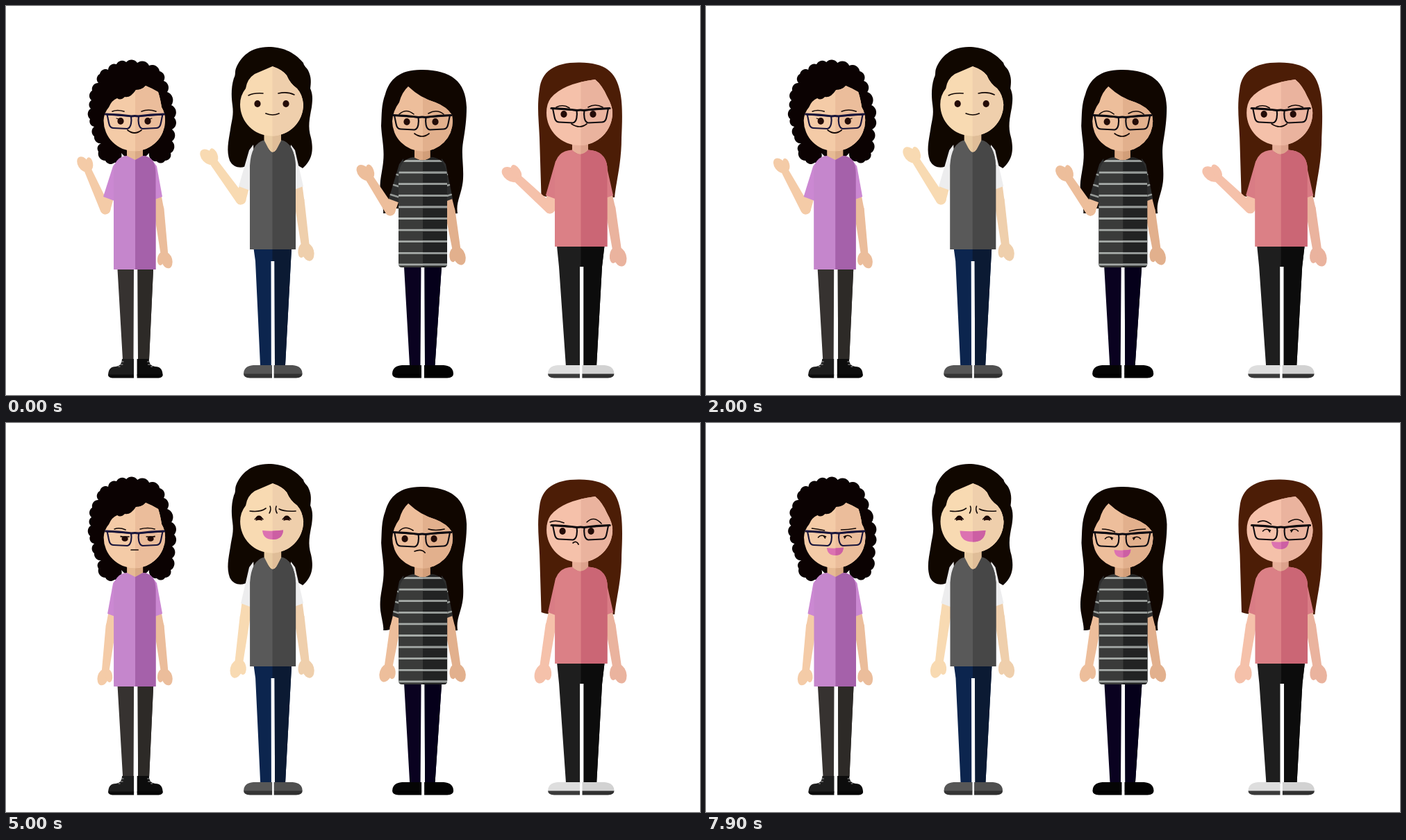
Write an HTML page that moves like this. It is 999x561 px and loops after 8000 ms.

```html
<!DOCTYPE html>
<html lang="en">
<head>
<meta charset="utf-8">
<title>Four friends waving</title>
<style>
html, body { margin: 0; width: 100%; height: 100%; overflow: hidden; background: #fff; }
svg { display: block; width: 999px; height: 561px; }
</style>
</head>
<body>
<svg id="stage" viewBox="0 0 999 561" xmlns="http://www.w3.org/2000/svg"></svg>
<script>
const LOOP = 8000;
const stage = document.getElementById('stage');
const lerp = (a, b, k) => a + (b - a) * k;
const clamp = k => Math.max(0, Math.min(1, k));
const smooth = k => (k = clamp(k), k * k * (3 - 2 * k));
const shape = (d, fill) => `<path d="${d}" fill="${fill}"/>`;
const line = (d, w = 1.7, c = '#120806') =>
  `<path d="${d}" fill="none" stroke="${c}" stroke-width="${w}" stroke-linecap="round" stroke-linejoin="round"/>`;
const mirror = (x, body) => `<g transform="translate(${2 * x} 0) scale(-1 1)">${body}</g>`;
const ellipse = (x, y, rx, ry, fill, turn = 0) =>
  `<ellipse cx="${x}" cy="${y}" rx="${rx}" ry="${ry}" fill="${fill}" transform="rotate(${turn} ${x} ${y})"/>`;
// light left half, dark right half
const split = (d, who, [a, b]) =>
  shape(d, a) + `<path d="${d}" fill="${b}" clip-path="url(#half${who.id})"/>`;

// outline made of outward bumps through the given points
function curls(p) {
  let d = `M${p[0]},${p[1]}`;
  for (let i = 2; i <= p.length; i += 2) {
    const j = i % p.length;
    const r = Math.hypot(p[j] - p[i - 2], p[j + 1] - p[i - 1]) * 0.62;
    d += `A${r.toFixed(1)},${r.toFixed(1)} 0 0 1 ${p[j]},${p[j + 1]}`;
  }
  return d + 'Z';
}

function glasses(x, y, c) {
  const lens = 'M-40,1L-5.500,3.500C-4.500,10 -5,20.500 -11,21.500L-31,20.500C-38,20 -37,13 -40,1Z';
  return `<g transform="translate(${x} ${y})">` + line(lens, 2.1, c) + mirror(0, line(lens, 2.1, c)) +
    line('M-42,0.500Q-22,1 -5,3.500Q0,2.500 5,3.500Q22,1 42,0.500', 3.2, c) + '</g>';
}

function shoe(x1, x2, c, sole) {
  return shape(`M${x2},518H${x1 + 14}Q${x1},519 ${x1},531H${x2}Z`, c) +
    shape(`M${x1},530.5H${x2}V536.5H${x1 + 9}Q${x1},536 ${x1},530.5Z`, sole);
}
const boot = (c, sole) =>
  shape('M167,509H184V533H147Q147,520 158,520Q167,519 167,509Z', c) +
  shape('M147,531.5H184V536.5H153Q147,536 147,531.5Z', sole) +
  line('M166,513h3M165,517h3M162,520h2', 1, '#aaa');

// each arm pose: sleeve hem x, elbow x y, hand x y
const people = [
  {
    id: 0, x: 186, skin: ['#f4cba7', '#ebbd9b'], neck: ['#e6ba94', '#d9a985'],
    hair: ['#0b0202', curls([159, 84, 173, 81, 189, 82, 206, 86, 221, 94, 227, 108, 232, 124, 238, 143, 242, 161,
      239, 178, 239, 195, 237, 212, 229, 223, 217, 224, 206, 212, 166, 212, 156, 226, 143, 223, 133, 210, 137, 198,
      127, 188, 127, 174, 121, 163, 122, 148, 123, 136, 124, 122, 133, 111, 135, 98, 147, 92])],
    face: 'M140.5,165Q141,154 148,146Q152,136 160,133Q165,137 171,131Q179,133 187,121Q196,121 201,115Q211,119 219,124Q222,133 224,146Q229,154 229,165A44.2,44.2 0 0 1 140.5,165Z',
    neckBox: 'M174,202H197V218L186,224L174,218Z',
    shirt: ['#c586cc', '#a561aa'],
    body: 'M155,380V240Q156,217 174,216L186,222L197,216Q215,217 215.500,240V380Z',
    pants: ['#363230', '#2d2a27'], legs: 'M160.500,380H184L183.500,510H168ZM189.500,380H212L206,510H190Z',
    shoes: boot('#1e1e1e', '#0c0c0c') + mirror(186.3, boot('#0c0c0c', '#050505')),
    sleeve: '#cb88d2', sy: 231, sx: 156, hy: 275, hand: 0.88,
    poses: [[140, 143, 293, 114, 228], [141, 143, 293, 120, 225], [140, 146, 293, 72, 276], [146, 151, 293, 142, 366]],
    glass: [185.5, 155.5, '#17143a'], lash: true
  },
  {
    id: 1, x: 383.5, skin: ['#f8dab2', '#efcfac'], neck: ['#e9cba2', '#dfbd98'],
    hair: ['#100700', 'M378,59C352,59 338,73 331,90C329,96 331,99 328,104C323,120 325,136 326,143C328,158 325,164 323,178C320,196 317,209 322,223C328,235 342,235 350,228H410C418,227 423,232 427,234C441,222 443,208 439,190C434,174 437,162 440,146C442,132 441,126 438,119C439,111 440,103 435,93C433,89 429,87 428,82C414,65 396,59 378,59Z'],
    face: 'M337,142Q337,129 345,119Q347,105 358,98Q372,92 383.500,87Q398,92 404,100Q409,112 419,119Q427,128 428,142A45.5,45.5 0 0 1 337,142Z',
    neckBox: 'M371.500,180H396V198L384,214L371.500,198Z',
    shirt: ['#595959', '#474747'],
    body: 'M351,351V230Q353,198 371.500,193.500L379,208Q384,214 389,208L396.500,193.500Q415,198 417,230V351Z',
    pants: ['#0c254e', '#0b1a33'], legs: 'M356.500,350H411L402,518H387L386.500,368H381.500L381.800,518H366L359,368Z',
    shoes: shoe(342, 383, '#575757', '#353535') + mirror(384.3, shoe(342, 383, '#4f4f4f', '#303030')),
    sleeve: '#ededee', sy: 208, sx: 352, hy: 260, hand: 0.98,
    poses: [[335, 338, 279, 293, 217], [335, 338, 279, 302, 211], [335, 338, 279, 292, 218], [338, 344, 280, 334, 354]]
  },
  {
    id: 2, x: 600, skin: ['#edbe9b', '#e2b08d'], neck: ['#deab86', '#d29e79'],
    hair: ['#100600', 'M600,92C568,91 552,105 546,127C540,143 541,156 540,173C541,192 545,205 543,225C541,243 537,254 539,271C541,284 544,294 543,299C552,299 556,298 559,292H636C640,299 646,300 650,299C647,282 657,270 658,249C659,228 655,215 658,196C661,178 663,164 663,146C662,108 640,93 600,92Z'],
    face: 'M556,166Q557,151 566,139Q570,124 579,116Q597,133 618,139Q634,145 642,157L643,166A43.500,43.500 0 0 1 556,166Z',
    neckBox: 'M588,204H610.500V219L600,224L588,219Z',
    shirt: ['#3a3b3a', '#222323'],
    body: 'M565,372V244Q567,220 587,218Q600,227 612,218Q633,220 635,244V372Q635,377 630,377H570Q565,377 565,372Z',
    stripe: { top: 223.5, gap: 16.6, count: 10 },
    pants: ['#0a0220', '#05001a'], legs: 'M573,376H597.500L596.500,518H581ZM602.500,376H627L617.500,518H603Z',
    shoes: shoe(556, 598, '#050505', '#000') + mirror(600, shoe(556, 598, '#020202', '#000')),
    sleeve: '#2d2e2e', sy: 228, sx: 568, hy: 278, hand: 0.98,
    poses: [[551, 553, 295, 518, 240], [551, 553, 295, 526, 236], [551, 555, 296, 491, 272], [556, 560, 295, 549, 360]],
    glass: [599, 157, '#0c0b12']
  },
  {
    id: 3, x: 827.5, skin: ['#f5c1aa', '#eab39e'], neck: ['#e8b09a', '#dca18c'],
    hair: ['#4c1d06', 'M826,81.500C790,81 771,94 768,120C764,145 767,165 768,190L770.500,273Q778,276 790,276H870L876,276C878,254 886,228 886,190C887,168 888,142 884,124C878,94 862,82 826,81.500Z'],
    face: 'M778,154Q778,141 784,133Q801,112 848,106Q858,114 865,130Q873,144 873,154A47.5,47 0 0 1 778,154Z',
    neckBox: 'M815,194H838V209L827,216L815,209Z',
    shirt: ['#db8086', '#cb6675'],
    body: 'M790,347V232Q792,209 815,207.500Q827,220 838,207.500Q863,209 865.500,232V347Z',
    pants: ['#1e1e1e', '#0c0c0c'], legs: 'M793,346H861.500L858,376L850,520H831.500V376H826V520H806L796,376Z',
    shoes: shoe(780, 826, '#dedede', '#3a3a3a') + mirror(827.7, shoe(780, 826, '#d2d2d2', '#303030')),
    sleeve: '#d97c85', sy: 224, sx: 793, hy: 273, hand: 1.06,
    poses: [[777, 783, 292, 729, 242], [777, 783, 292, 738, 234], [777, 784, 290, 714, 267], [780, 784, 292, 773, 361]],
    glass: [827, 147, '#0e0a0e']
  }
];

// [from ms, left eye x, right eye x, eye y, eye kind, brows, mouth]
const tense = 'M351,127Q366,129 374,123M393,124Q400,128 417,127M380,120Q382,125 379,130M389,120Q387,125 390,130';
const faces = [
  [
    [0, 165, 204, 166, 'dot', 'M153,152Q160,149 170,152M195,152Q205,148 216,152', 'M175,179Q185,187 195,179'],
    [3000, 171, 208, 166, 'dot', 'M156,151Q163,149 172,153M193,152Q204,149 214,152', 'M180,182Q187,179 195,183'],
    [4400, 171, 208, 167, 'lid', 'M156,153Q163,150 172,154M193,153Q204,150 214,153', 'M180,183H190'],
    [5800, 166, 204, 167, 'dot', 'M152,152Q161,153 170,155M194,154Q204,154 215,152', 'M179,181Q186,184 194,181'],
    [7200, 166, 204, 164, 'joy', 'M152,152Q161,153 170,155M194,154Q204,154 215,152', 'O173.500,180 24 11']
  ],
  [
    [0, 362, 403, 141, 'dot', 'M349,129Q357,125 370,126M392,126Q405,123 415,128', 'M374,155Q384,159 393,155'],
    [2300, 362, 403, 141, 'dot', 'M349,128Q357,124 370,126M392,125Q405,122 415,127', 'M375,154.500Q386,161 395,153'],
    [3300, 364, 404, 138, 'arc', tense, 'O369,155 30 13'],
    [7200, 364, 404, 138, 'arc', tense, 'O365,155.500 37 16']
  ],
  [
    [0, 577, 618, 167, 'dot', 'M566,156Q576,147 587,156M608,155Q620,148 630,156', 'M588,184Q599,192 609,184'],
    [3000, 574, 616, 167, 'dot', 'M566,155Q574,149 586,156M607,157Q618,151 630,155', 'M590,186Q597,182 605,187'],
    [4400, 574, 616, 167, 'dot', 'M566,156Q574,147 586,155M608,153Q618,156 631,153', 'M588,185Q598,181 603,187'],
    [5800, 579, 620, 167, 'dot', 'M570,153Q579,153 588,157M609,156Q620,153 632,153', 'M592,183Q599,187 607,183'],
    [7200, 579, 620, 166, 'joy', 'M570,153Q579,153 588,157M609,156Q620,153 632,153', 'O587,183 24 11']
  ],
  [
    [0, 803, 845, 156, 'dot', 'M792,146Q802,141 811,147M838,146Q848,140 859,146', 'M814,170Q826,178 836,170'],
    [3000, 801, 842, 156, 'dot', 'M791,147Q800,141 809,147M836,147Q845,141 857,146', 'M817,173Q824,169 832,174'],
    [4400, 801, 842, 156, 'dot', 'M783,143Q791,139 803,144M836,143Q846,133 857,145', 'M816,173Q821,169 824,175'],
    [5800, 806, 847, 156, 'dot', 'M794,143Q803,138 813,146M838,143Q850,135 859,143', 'M819,172Q827,176 834,172'],
    [7200, 806, 847, 155, 'joy', 'M794,143Q803,138 813,146M838,143Q850,135 859,143', 'O813.500,171 25 11']
  ]
];

function eye(x, y, kind, side, lash) {
  if (kind === 'joy') return line(`M${x - 6 * side},${y}Q${x + side},${y - 4} ${x + 5 * side},${y + 1}M${x - 3 * side},${y - 1}L${x - 5 * side},${y + 2}`, 1.6);
  if (kind === 'arc') return shape(`M${x - 4.5},${y + 3}V${y}A4.5,4.5 0 0 1 ${x + 4.5},${y}V${y + 3}Q${x},${y + 1} ${x - 4.5},${y + 3}Z`, '#230b07') +
    line(`M${x - 6},${y + 1}Q${x},${y - 7} ${x + 6},${y + 1}`, 1.3);
  const lashes = lash ? line(`M${x + 3 * side},${y - 3}l${3 * side},-1`, 1.2) : '';
  const lid = kind === 'lid' ? line(`M${x - 6},${y - 3}h12`, 1.5) : '';
  return ellipse(x, y, 4.6, kind === 'lid' ? 3.8 : 5, '#230b07') + lashes + lid;
}

function drawFace(who, t) {
  const [, lx, rx, y, kind, brows, mouth] = faces[who.id].filter(f => f[0] <= t).pop();
  let lips;
  if (mouth[0] === 'O') {
    const [x, my, w, h] = mouth.slice(1).split(/[ ,]/).map(Number);
    lips = split(`M${x},${my}q${w / 2},1.500 ${w},-0.500Q${x + w - 1},${my + h} ${x + w / 2},${my + h}Q${x + 1},${my + h} ${x},${my}Z`, who, ['#dc72b1', '#cc5fa3']);
  } else lips = line(mouth);
  return eye(lx, y, kind, -1, who.lash) + eye(rx, y, kind, 1, who.lash) + line(brows, 1.6) + lips +
    (who.glass ? glasses(...who.glass) : '');
}

function mixPose(a, b, k) {
  const polar = p => {
    const dx = p[3] - p[1], dy = p[4] - p[2];
    return [(Math.atan2(dy, dx) + 2 * Math.PI) % (2 * Math.PI), Math.hypot(dx, dy)];
  };
  const [a1, l1] = polar(a), [a2, l2] = polar(b);
  const ang = lerp(a1, a2, k), len = lerp(l1, l2, k);
  const [hem, ex, ey] = [0, 1, 2].map(i => lerp(a[i], b[i], k));
  return [hem, ex, ey, ex + len * Math.cos(ang), ey + len * Math.sin(ang)];
}

function arm(who, pose, skin, thumb) {
  const [hem, ex, ey, hx, hy] = pose;
  const len = Math.hypot(hx - ex, hy - ey), turn = Math.atan2(hy - ey, hx - ex) * 180 / Math.PI;
  const s = who.hand, top = who.sx, inner = hem + 16;
  const upper = line(`M${hem + 9},${who.hy - 3}L${ex},${ey}`, 14.5, skin);
  const fore = shape(`M0,-7.500L${len - 8},-${6 * s}V${6 * s}L0,7.500A7.500,7.500 0 0 1 0,-7.500Z`, skin);
  const palm = ellipse(len + 1, -2.5 * thumb, 13.5 * s, 8.8 * s, skin, -8 * thumb) +
    ellipse(len - 2, 6 * thumb, 10.5 * s, 5.5 * s, skin, 14 * thumb);
  const cuff = `M${top + 4},${who.sy - 8}L${top - 2},${who.sy}L${hem},${who.hy}L${inner},${who.hy + 6}L${top + 8},${who.hy}Z`;
  let bands = '';
  if (who.stripe) {
    for (const y of [243, 258, 272]) {
      const x = lerp(top - 2, hem, (y - who.sy) / (who.hy - who.sy));
      bands += line(`M${x + 1},${y}L${x + 14},${y + 4}`, 2.5, '#969b98');
    }
  }
  return upper + `<g transform="translate(${ex} ${ey}) rotate(${turn})">${fore}${palm}</g>` + shape(cuff, who.sleeve) + bands;
}

function armPose(who, t) {
  const [out, up, point, rest] = who.poses;
  const wave = mixPose(out, up, (1 - Math.cos(2 * Math.PI * t / 900)) / 2);
  if (t >= 2700) return mixPose(who.id === 1 ? out : point, rest, smooth((t - 2700) / 560));
  if (who.id === 1 || t < 1850) return wave;
  const k = t < 2500 ? 0.9 * smooth((t - 1850) / 650) : 0.9 + 0.1 * clamp((t - 2600) / 100);
  return mixPose(wave, point, k);
}

let defs = '', scene = '';
for (const p of people) {
  defs += `<clipPath id="half${p.id}"><rect x="${p.x}" y="0" width="300" height="561"/></clipPath>`;
  let stripes = '';
  if (p.stripe) {
    defs += `<clipPath id="tee"><path d="${p.body}"/></clipPath>`;
    const { top, gap, count } = p.stripe;
    const d = Array.from({ length: count }, (_, i) => `M565,${top + gap * i - 1.4}h70v2.8h-70Z`).join('');
    stripes = `<g clip-path="url(#tee)">${split(d, p, ['#a6aba8', '#959a98'])}</g>`;
  }
  scene += shape(p.hair[1], p.hair[0]) + split(p.legs, p, p.pants) + p.shoes +
    `<g id="arm${p.id}"></g>` + mirror(p.x - 0.5, arm(p, p.poses[3], p.skin[1], -1)) +
    split(p.neckBox, p, p.neck) + split(p.body, p, p.shirt) + stripes +
    split(p.face, p, p.skin) + `<g id="face${p.id}"></g>`;
}
stage.innerHTML = `<defs>${defs}</defs><g id="cast">${scene}</g>`;
const cast = document.getElementById('cast');
const parts = people.map(p => [document.getElementById('arm' + p.id), document.getElementById('face' + p.id)]);

// slight sideways sway: [ms, px]
const sway = [[0, 0], [1300, 0], [2700, 0.4], [3800, 0.9], [5000, 0.1], [6600, 0.4], [8000, 0.5]];
function swayAt(t) {
  const i = sway.findIndex(s => s[0] > t);
  const [a, x] = sway[i - 1], [b, y] = sway[i];
  return lerp(x, y, (t - a) / (b - a));
}

function draw(t) {
  cast.setAttribute('transform', `translate(${swayAt(t).toFixed(2)} 0)`);
  people.forEach((p, i) => {
    parts[i][0].innerHTML = arm(p, armPose(p, t), p.skin[0], t < 2980 ? 1 : -1);
    parts[i][1].innerHTML = drawFace(p, t);
  });
}

const start = performance.now();
function tick() {
  draw((performance.now() - start) % LOOP);
  requestAnimationFrame(tick);
}
tick();
</script>
</body>
</html>
```
